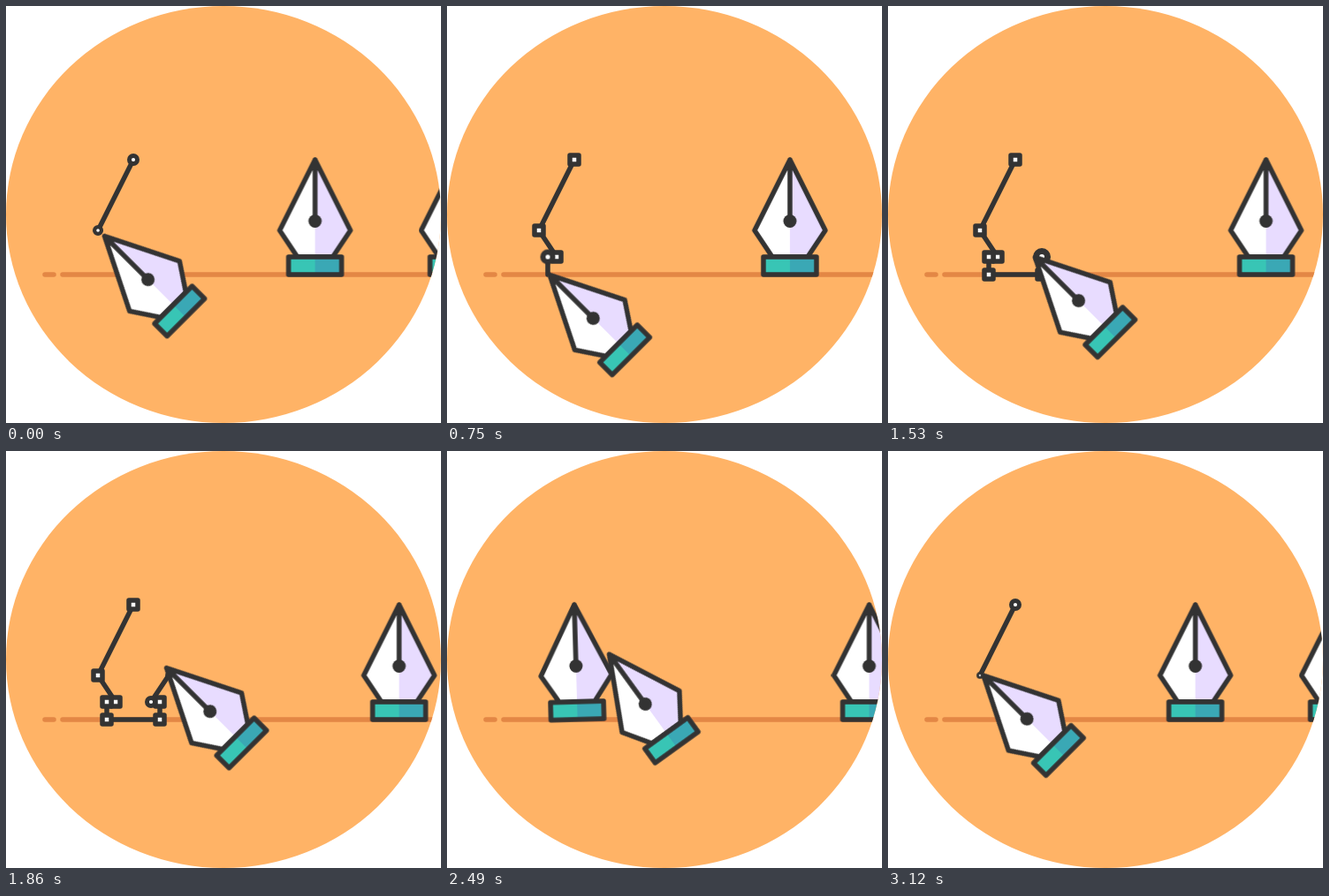
These frames come from a looping animation (492x472 px, 3150 ms). An HTML page without scripts:

```html
<!DOCTYPE html>
<html lang="en">
<head>
<meta charset="utf-8">
<title>Pen nibs</title>
<style>
html, body { margin: 0; width: 100%; height: 100%; overflow: hidden; background: #fff; }
svg { display: block; width: 492px; height: 472px; }
svg * { animation-duration: 3150ms; animation-iteration-count: infinite; animation-timing-function: linear; }
.ink { stroke: #333; stroke-width: 5.5; stroke-linejoin: round; stroke-linecap: round; fill: none; }

/* finished nibs drift right by one spacing per loop */
#belt { animation-name: drift; }
@keyframes drift {
  0% { transform: translate(349.5px, 174px); }
  14.286% { transform: translate(372.5px, 174px); }
  31.429% { transform: translate(400px, 174px); }
  48.571% { transform: translate(427.5px, 174px); }
  68.571% { transform: translate(460px, 174px); }
  88.571% { transform: translate(493.3px, 174px); }
  99.048% { transform: translate(507.5px, 174px); }
  100% { transform: translate(509.5px, 174px); }
}

/* the drawing pen hops between anchors, then joins the belt */
#pen { animation-name: draw; animation-timing-function: cubic-bezier(.35, .3, .7, .95); }
@keyframes draw {
  0% { transform: translate(111.4px, 260.4px) rotate(-45deg); animation-timing-function: cubic-bezier(.4, .4, .7, .95); }
  6.667% { transform: translate(126px, 284.4px) rotate(-45deg); }
  15.238% { transform: translate(116px, 284.4px) rotate(-45deg); }
  23.81% { transform: translate(116px, 304.4px) rotate(-45deg); }
  32.381% { transform: translate(176px, 304.4px) rotate(-45deg); }
  40.952% { transform: translate(176px, 284.4px) rotate(-45deg); }
  49.524% { transform: translate(166px, 284.4px) rotate(-45deg); }
  58.095% { transform: translate(186px, 254.4px) rotate(-45deg); }
  66.667% { transform: translate(146px, 174.4px) rotate(-45deg); }
  75.238% { transform: translate(146px, 244.4px) rotate(-45deg); }
  76.19% { transform: translate(146px, 244.4px) rotate(-45deg); animation-timing-function: cubic-bezier(.4, 0, .3, 1); }
  87.619% { transform: translate(331.7px, 174px); animation-timing-function: linear; }
  88.571% { transform: translate(333.3px, 174px); animation-timing-function: linear; }
  99.048% { transform: translate(347.5px, 174px); animation-timing-function: linear; }
  100% { transform: translate(349.5px, 174px); }
}

/* the drawn nib fills, tilts and becomes the next pen */
#fresh { animation-name: tilt; }
@keyframes tilt {
  0%, 75.238% { opacity: 0; transform: translate(144px, 174px) rotate(0deg); }
  77.143% { opacity: 1; transform: translate(144px, 174px) rotate(0deg); animation-timing-function: cubic-bezier(.45, 0, .7, .9); }
  88.571% { opacity: 1; transform: translate(143px, 171.5px) rotate(-37deg); }
  89.524% { transform: translate(145px, 174px) rotate(-43deg); animation-timing-function: cubic-bezier(.35, .3, .7, .95); }
  98.095% { transform: translate(106px, 253.4px) rotate(-45deg); }
  99.048% { transform: translate(107.9px, 253.9px) rotate(-45deg); }
  100% { opacity: 1; transform: translate(111.4px, 260.4px) rotate(-45deg); }
}

/* each edge appears when the pen lands */
#edge { stroke-linecap: butt; stroke-dasharray: 441 900; animation-name: edge; animation-timing-function: step-end; }
@keyframes edge {
  0% { stroke-dashoffset: 351.6; }
  6.667% { stroke-dashoffset: 315.5; }
  15.238% { stroke-dashoffset: 305.5; }
  23.81% { stroke-dashoffset: 285.5; }
  32.381% { stroke-dashoffset: 225.5; }
  40.952% { stroke-dashoffset: 205.5; }
  49.524% { stroke-dashoffset: 195.5; }
  58.095% { stroke-dashoffset: 159.4; }
  66.667% { stroke-dashoffset: 70; }
  75.238% { stroke-dashoffset: 0; }
  77.143% { stroke-dashoffset: 441; }
  98.095%, 100% { stroke-dashoffset: 351.6; }
}

/* anchors: a dot pops up, then turns into a box; --t is the landing time */
.dot, .box { fill: #fff; stroke: #333; stroke-linejoin: round; animation-delay: calc(var(--t) - 3150ms); }
.dot { stroke-width: 7; animation-name: dot; }
.box { stroke-width: 5.5; animation-name: box; }
.first .box { animation-name: box-long; }
@keyframes dot {
  0% { transform: scale(0); }
  .952% { transform: scale(.38); }
  1.905% { transform: scale(.6); }
  4.762%, 7.7% { transform: scale(1); }
  9.524%, 10.8% { transform: scale(.7); }
  10.81%, 100% { transform: scale(0); }
}
@keyframes box {
  0%, 10.8% { transform: scale(0); }
  10.81% { transform: scale(.8); }
  13.3%, 72.38% { transform: scale(1); }
  72.39%, 100% { transform: scale(0); }
}
@keyframes box-long {
  0%, 10.8% { transform: scale(0); }
  10.81% { transform: scale(.8); }
  13.3%, 88.88% { transform: scale(1); }
  88.89%, 100% { transform: scale(0); }
}
.first, .mid, .last { animation-timing-function: step-end; }
.first { animation-name: first; }
.mid { animation-name: mid; }
.last { animation-name: last; }
@keyframes first {
  0% { opacity: 1; }
  77.143% { opacity: 0; }
  89.524%, 100% { opacity: 1; }
}
@keyframes mid {
  0% { opacity: 0; }
  6.667% { opacity: 1; }
  77.143%, 100% { opacity: 0; }
}
@keyframes last {
  0% { opacity: 0; }
  40.952% { opacity: 1; }
  77.143%, 100% { opacity: 0; }
}
</style>
</head>
<body>
<svg viewBox="0 0 492 472">
  <defs>
    <clipPath id="disc"><ellipse cx="246" cy="236" rx="246" ry="236"/></clipPath>
    <g id="nib">
      <path d="M0 0L-40 80L-20 110H20L40 80Z" fill="#fff"/>
      <path d="M0 0V110H20L40 80Z" fill="#e8dcff"/>
      <path class="ink" d="M0 0L-40 80L-20 110H20L40 80ZV69.5"/>
      <circle cy="69.5" r="7.5" fill="#333"/>
      <path d="M-30 110H0V130H-30Z" fill="#38c5b5"/>
      <path d="M0 110H30V130H0Z" fill="#3aa8b5"/>
      <path class="ink" d="M-30 110H30V130H-30Z"/>
    </g>
  </defs>
  <g clip-path="url(#disc)">
    <rect width="492" height="472" fill="#ffb366"/>
    <path d="M44 304H54M64 304H492" stroke="#e38745" stroke-width="5.5" stroke-linecap="round"/>
    <g id="belt">
      <use href="#nib"/>
      <use href="#nib" x="160"/>
    </g>
    <path id="edge" class="ink" d="M144 174L104 254L124 284H114V304H174V284H164L184 254L144 174V244"/>
    <g class="first">
      <g transform="translate(144 174)" style="--t:2820ms"><circle class="dot" r="6.5"/><rect class="box" x="-5" y="-5" width="10" height="10"/></g>
      <g transform="translate(104 254)" style="--t:3090ms"><circle class="dot" r="6.5"/><rect class="box" x="-5" y="-5" width="10" height="10"/></g>
    </g>
    <g class="mid">
      <g transform="translate(124 284)" style="--t:210ms"><circle class="dot" r="6.5"/><rect class="box" x="-5" y="-5" width="10" height="10"/></g>
      <g transform="translate(114 284)" style="--t:480ms"><circle class="dot" r="6.5"/><rect class="box" x="-5" y="-5" width="10" height="10"/></g>
      <g transform="translate(114 304)" style="--t:750ms"><circle class="dot" r="6.5"/><rect class="box" x="-5" y="-5" width="10" height="10"/></g>
      <g transform="translate(174 304)" style="--t:1020ms"><circle class="dot" r="6.5"/><rect class="box" x="-5" y="-5" width="10" height="10"/></g>
    </g>
    <g class="last">
      <g transform="translate(174 284)" style="--t:1290ms"><circle class="dot" r="6.5"/><rect class="box" x="-5" y="-5" width="10" height="10"/></g>
      <g transform="translate(164 284)" style="--t:1560ms"><circle class="dot" r="6.5"/><rect class="box" x="-5" y="-5" width="10" height="10"/></g>
      <g transform="translate(184 254)" style="--t:1830ms"><circle class="dot" r="6.5"/><rect class="box" x="-5" y="-5" width="10" height="10"/></g>
    </g>
    <g id="fresh"><use href="#nib"/></g>
    <g id="pen"><use href="#nib"/></g>
  </g>
</svg>
</body>
</html>
```
